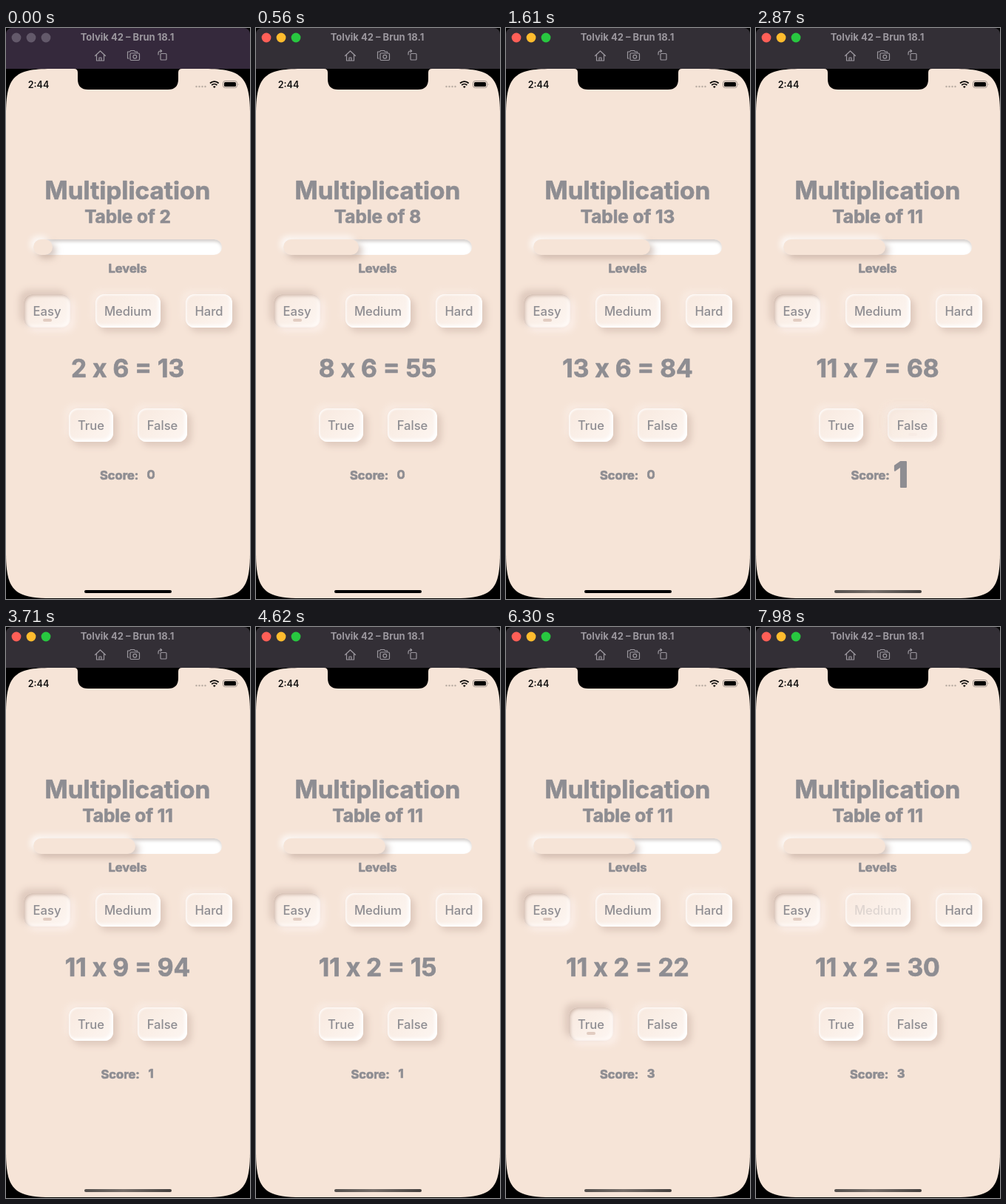
An HTML page for the animation above (8000 ms loop, 330 by 770 pixels).

```html
<!DOCTYPE html>
<html lang="en">
<head>
<meta charset="utf-8">
<style>
html, body { margin: 0; width: 100%; height: 100%; overflow: hidden; background: #000; }
#stage { position: relative; width: 330px; height: 770px; overflow: hidden; background: #000; }
#stage div, svg { position: absolute; }
svg { left: 0; top: 0; }
#bar { width: 330px; height: 55px; border-radius: 8px 8px 0 0; }
#track, #fill { left: 37px; top: 285px; height: 21px; border-radius: 10.5px; }
#track { width: 255px; background: #fff; box-shadow: inset 1px 3px 4px #d2cdca; }
#fill { background: #f6e4d7; box-shadow: 5px 5px 8px rgba(175,148,134,.5), -4px -4px 8px rgba(255,255,255,.85); }
.up, .down { inset: 0; border-radius: 12px; background: linear-gradient(135deg, #f8e9df, #fbf1ea 60%, #fdf6f2); }
.up { box-shadow: 5px 5px 8px 1px #dfcabe, -5px -5px 9px #f9ebe2, inset -3px -3px 4px #fff, inset 1px 1px 3px #fff; }
.down { box-shadow: -5px -5px 9px 1px #dfcabe, 5px 5px 9px 1px #fbeee7, inset 2px 2px 4px #cfb9ad, inset -3px -3px 4px #fffaf7; }
.down::after { content: ""; position: absolute; left: 50%; top: 33px; width: 12px; height: 4px; margin-left: -6px; border-radius: 2px; background: #e1ccc1; }
#home { left: 106px; top: 758px; width: 118px; height: 4px; border-radius: 2px; }
text { font-family: Inter, "Open Sans", sans-serif; fill: #8e8d92; text-anchor: middle; }
.round { font-weight: 700; stroke: #8e8d92; stroke-width: .7; stroke-linejoin: round; }
.label { font-size: 16.6px; font-weight: 500; }
.icon { fill: none; stroke: #9c989f; stroke-width: 1.2; stroke-linejoin: round; stroke-linecap: round; }
</style>
</head>
<body>
<div id="stage">
  <div id="bar"></div>
  <svg width="330" height="770">
    <path d="M0 55h330v714H0z"/>
    <path fill="#f6e4d7" d="M0 116C0 66 11 55 61 55H269C319 55 330 66 330 116V708C330 758 319 769 269 769H61C11 769 0 758 0 708z"/>
  </svg>
  <div id="track"></div>
  <div id="fill"></div>
  <div id="home"></div>
  <svg id="art" width="330" height="770">
    <g id="lights"><circle cx="14" cy="13" r="6.4"/><circle cx="34" cy="13" r="6.4"/><circle cx="54" cy="13" r="6.4"/></g>
    <text x="164" y="17" font-size="13" font-weight="700" style="fill:#9b979e">Tolvik 42 – Brun 18.1</text>
    <g class="icon">
      <path d="M120.5 37.5l7-6.5 7 6.5M122.5 36v8h10v-8M126 44v-4h3v4"/>
      <path d="M166 41h-1.5v-9h3l1-1.5h5l1 1.5h3v1"/>
      <rect x="168" y="34" width="12.5" height="9.5" rx="1.5"/><circle cx="174.3" cy="38.8" r="2.4"/>
      <rect x="209" y="34.5" width="8" height="8.5" rx="1"/><path d="M206 36v-2q0-3 3-3h1.5M209 29.5l1.7 1.5-1.7 1.5"/>
    </g>
    <path d="M92 55q5 0 5 5v9q0 14 14 14h108q14 0 14-14v-9q0-5 5-5z"/>
    <text x="44" y="81" font-size="12.5" font-weight="600" style="fill:#111">2:44</text>
    <path d="M257.5 79h14" stroke="#b9aca3" stroke-width="2.4" stroke-linecap="round" stroke-dasharray="0 4"/>
    <path d="M276 74.5a8.5 8.5 0 0 1 11.6 0M278.2 77a5.4 5.4 0 0 1 7.2 0" fill="none" stroke="#000" stroke-width="1.8"/>
    <path d="M279.9 79q1.9-1.5 3.8 0l-1.9 2z"/>
    <rect x="293.5" y="71.5" width="19" height="9" rx="2.8" fill="none" stroke="#9b8f88"/>
    <rect x="295" y="73" width="16" height="6" rx="1.5"/>
    <path d="M314 74.5q1.5 1.5 0 3z" fill="#9b8f88"/>
    <g class="round">
      <text x="164.5" y="231" font-size="33.4">Multiplication</text>
      <text id="table" x="164.5" y="263" font-size="24.4"></text>
      <text x="164.5" y="329.5" font-size="16.5">Levels</text>
      <text id="quiz" x="164.5" y="471" font-size="33.6"></text>
      <text id="score" y="608.5" font-size="16.5" style="text-anchor:start">Score:</text>
      <text id="points" y="6" font-size="16.5"></text>
    </g>
  </svg>
</div>
<script>
const $ = id => document.getElementById(id);
const ramp = (t, a, b) => Math.min(1, Math.max(0, (t - a) / (b - a)));

// Buttons: left, top, width
const buttons = {};
function addButton(name, x, y, w) {
  const box = document.createElement('div');
  box.style.cssText = `left:${x}px;top:${y}px;width:${w}px;height:45px`;
  box.innerHTML = '<div class="up"></div><div class="down"></div>';
  $('stage').insertBefore(box, $('art'));
  const label = document.createElementNS('http://www.w3.org/2000/svg', 'text');
  label.setAttribute('class', 'label');
  label.setAttribute('x', x + w / 2);
  label.setAttribute('y', y + 28.5);
  label.textContent = name;
  $('art').append(label);
  buttons[name] = { up: box.children[0], down: box.children[1], label };
}
addButton('Easy', 24, 359, 63);
addButton('Medium', 121, 359, 88);
addButton('Hard', 243, 359, 63);
addButton('True', 85, 513, 60);
addButton('False', 178, 513, 67);

// Taps: button, label dims, press starts, release starts
const taps = [
  ['False', 2520, 2590, 2770], ['True', 3500, 3430, 3570], ['True', 4270, 4340, 4480],
  ['False', 4970, 4970, 5110], ['False', 5670, 5740, 5880], ['True', 6160, 6160, 6440],
  ['False', 7000, 7000, 7140], ['Medium', 7910, 8000, 8200]
];
// Slider: time, right edge of the fill
const drag = [[350, 63], [840, 240], [980, 239], [1120, 236], [1330, 236], [1610, 195], [1890, 175]];
const quizzes = [[2800, '7 = 68'], [3570, '9 = 94'], [4480, '2 = 15'], [5040, '5 = 58'], [5810, '2 = 22'], [7140, '2 = 30']];
const pops = [2870, 5110, 5880];

function sliderEdge(t) {
  let edge = drag[0][1];
  for (let i = 1; i < drag.length; i++)
    edge += (drag[i][1] - drag[i - 1][1]) * ramp(t, drag[i - 1][0], drag[i][0]);
  return edge;
}

function drawButtons(t) {
  for (const name in buttons) {
    const { up, down, label } = buttons[name];
    let press = name === 'Easy' ? 1 : 0, dim = 0;
    for (const [who, touch, start, release] of taps) {
      if (who !== name) continue;
      press += ramp(t, start, start + 140) - ramp(t, release, release + 140);
      if (t >= touch && t < start + 70) dim = ramp(t, touch - 70, touch + 70);
    }
    up.style.opacity = 1 - press ** 2;
    down.style.opacity = press ** 2;
    label.style.opacity = 1 - .75 * dim;
  }
}

function drawScore(t) {
  let points = 0, scale = 1;
  for (const peak of pops) {
    if (t >= peak - 70) points++;
    scale += 1.85 * (ramp(t, peak - 140, peak) - 1 + (1 - ramp(t, peak, peak + 420)) ** 2);
  }
  $('score').setAttribute('x', points === 1 ? 128.5 : 127);
  $('points').textContent = points;
  $('points').setAttribute('transform', `translate(196 602.3) scale(${scale})`);
}

function draw(t) {
  const active = t >= 420;
  $('bar').style.background = active ? '#332f36' : '#35293c';
  ['#ff5f57', '#febc2e', '#28c840'].forEach((c, i) =>
    $('lights').children[i].setAttribute('fill', active ? c : '#63596a'));
  $('home').style.background = t < 2520 ? '#000' : 'linear-gradient(90deg, #54504d, #766e69 45%, #433f3d)';

  const edge = sliderEdge(t), n = Math.ceil((edge - 37.5) / 12.75);
  $('fill').style.width = edge - 37 + 'px';
  $('table').textContent = 'Table of ' + n;
  const asked = quizzes.filter(q => t >= q[0]).pop();
  $('quiz').textContent = `${n} x ` + (asked ? asked[1] : `6 = ${n * 6 + (5 + 7 * n) % 9}`);

  drawButtons(t);
  drawScore(t);
}

// The screen refreshes every 70 ms
const began = performance.now();
function tick() {
  draw(Math.floor((performance.now() - began) % 8000 / 70) * 70);
  requestAnimationFrame(tick);
}
tick();
</script>
</body>
</html>
```
